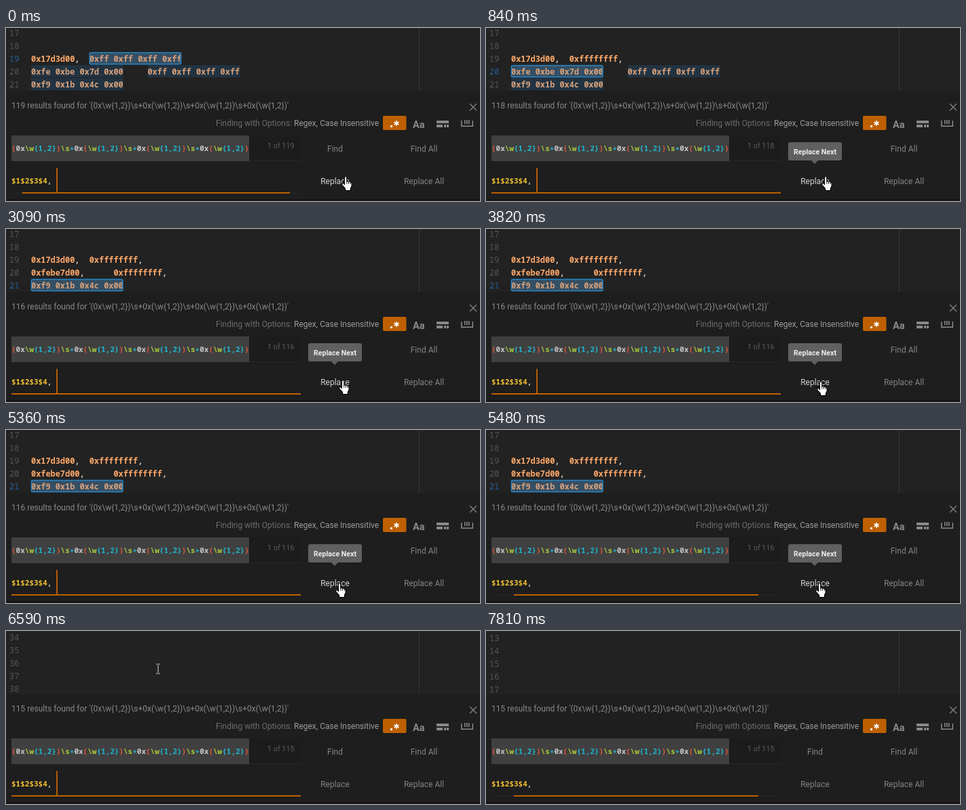
These frames come from a looping animation (698 px wide and 256 px high, 7.91 s). An HTML page with a canvas:

```html
<!DOCTYPE html>
<html lang="en">
<head>
<meta charset="utf-8">
<title>Find and replace</title>
<style>
  html, body { margin: 0; width: 100%; height: 100%; overflow: hidden; background: #1e1e1e; }
  canvas { display: block; }
</style>
</head>
<body>
<canvas id="stage" width="698" height="256"></canvas>
<script>
const g = document.getElementById('stage').getContext('2d');
const LOOP = 7910, W = 698, H = 256;
const PANEL_Y = 93, ROW = 19, CODE_X = 37, CHAR = 7.147, INPUT_CHAR = 6.6;
const MONO = '"Noto Sans Mono", "DejaVu Sans Mono", monospace';
const UI = 'Roboto, "Open Sans", sans-serif';
const CODE_FONT = `600 11.91px ${MONO}`, NUMBER_FONT = `11.91px ${MONO}`;
const INPUT_FONT = `600 11px ${MONO}`;
const ORANGE = '#bf6000';

const STEP = 140;               // pace of the screen updates
const BLINK = 390;              // caret half period
const CLICKS = [-STEP, 1240, 2080, 5480];
const WHEEL_START = 6320;
const FF = '[0xff 0xff 0xff 0xff]';

const ramp = (t, from, to) => Math.min(1, Math.max(0, (t - from) / (to - from)));
const ease = (t, from, to) => {
  const p = ramp(t, from, to);
  return p * p * (3 - 2 * p);
};

// A click blurs the field, one step later it regains focus, one more and the match is replaced.
function stateAt(t) {
  const clicks = t >= LOOP - STEP ? [...CLICKS, LOOP - STEP] : CLICKS;
  const since = t - clicks.filter(c => t >= c).pop();
  const replaced = CLICKS.filter(c => t >= c + 2 * STEP).length;
  const focused = since - STEP;
  const leave = ease(t, 5760, 6180);
  const nudge = ease(t, 2360, 2510), drift = ease(t, 3370, 4250);
  let scroll = replaced < 4 ? 315 : 876;
  if (t >= WHEEL_START) {
    const turns = 1 + Math.floor((t - WHEEL_START) / STEP);
    scroll = Math.max(236, 876 - 120 * turns);
  }
  return {
    replaced, scroll,
    underline: Math.min(213, 180 + 17 * Math.floor(since / STEP)),
    caret: focused >= 0 && Math.floor(focused / BLINK) % 2 === 0,
    tooltip: ramp(t, 400, 690) * Math.min(1, Math.abs(t - 3520) / 250) * (1 - ramp(t, 5760, 6000)),
    pointer: {
      kind: t > 7380 ? 'none' : leave > .2 ? 'beam' : 'hand',
      x: 494 - 4 * nudge - 5 * drift - 261 * leave,
      y: 219 + 4 * nudge + 3 * drift - 170 * leave
    }
  };
}

function rect(x, y, w, h, color) {
  g.fillStyle = color;
  g.fillRect(x, y, w, h);
}

function text(s, x, y, font, color, align = 'left') {
  g.font = font;
  g.fillStyle = color;
  g.textAlign = align;
  g.fillText(s, x, y);
}

function line(x1, y1, x2, y2, color, width) {
  g.strokeStyle = color;
  g.lineWidth = width;
  g.beginPath();
  g.moveTo(x1, y1);
  g.lineTo(x2, y2);
  g.stroke();
}

// Brackets mark a match; one left open runs on to the next wrapped row.
function codeFor(n, done) {
  if (n === 19) return '0x17d3d00,  ' + (done < 1 ? FF : '0xffffffff,');
  if (n === 20) {
    if (done < 2) return '[0xfe 0xbe 0x7d 0x00]     ' + FF;
    return '0xfebe7d00,      ' + (done < 3 ? FF : '0xffffffff,');
  }
  if (n === 21) return done < 4 ? '[0xf9 0x1b 0x4c 0x00]' : '0xf91b4c00,';
  return '';
}

// Wraps the byte list at the editor width and brackets every run of four.
function wrapBytes() {
  const ff = 'ff ff ff ff';
  const bytes = `${ff} 1 6e 9f 0 ${ff} e6 a8 c 0 ${ff} 1 87 df 0 ${ff} f4 92 df  0 ${ff} f9 d9 1d 0 ` +
    `${ff} 1 61 4c 0 ff  ff ff ff e6 bb ae 0 ${ff} 1 97 1d 0 ${ff} f3 df ee 0 ff`;
  const rows = [''];
  let col = 0, i = 0;
  for (const b of bytes.split(' ')) {
    if (b && col + b.length + 2 > 91) {
      rows.push('');
      col = 4;
    }
    const opens = i === 0 || (i > 5 && i % 4 === 2);
    const closes = i === 3 || (i > 6 && i % 4 === 1);
    rows[rows.length - 1] += b ? (opens ? '[' : '') + '0x' + b + (closes ? '] ' : ' ') : ' ';
    col += b ? b.length + 3 : 1;
    if (b) i++;
  }
  return rows.map(r => r.trimEnd());
}
const longLine = wrapBytes();

// Splits a marked row into plain text and match spans in pixels.
function parseRow(marked, x) {
  const spans = [];
  let plain = '';
  let start = /^[^\[]*\]/.test(marked) ? CODE_X : null;
  for (const c of marked) {
    const here = x + plain.length * CHAR;
    if (c === '[') start = here;
    else if (c === ']') { spans.push([start, here]); start = null; }
    else plain += c;
  }
  if (start !== null) spans.push([start, W]);
  return { plain, spans };
}

function codeRow(marked, x, mid, selected) {
  const { plain, spans } = parseRow(marked, x);
  const top = mid - 10;
  const sel = selected && spans[0];
  if (sel) rect(sel[0], top, sel[1] - sel[0] - 1, 18, '#39444d');
  text(plain.replace(/,/g, ' '), x, mid + 4, CODE_FONT, '#ffa869');
  text(plain.replace(/[^,]/g, ' '), x, mid + 4, CODE_FONT, '#d8cabc');
  for (const [a, b] of spans) rect(a, top, b - a, 18, 'rgba(34,128,206,.18)');
  if (sel) {
    g.strokeStyle = '#2a86c6';
    g.lineWidth = 1.5;
    g.beginPath();
    g.roundRect(sel[0] + .5, top + .5, sel[1] - sel[0] - 1.5, 17, 2);
    g.stroke();
  }
}

function editor(scroll, done) {
  g.save();
  g.beginPath();
  g.rect(0, 0, W, PANEL_Y);
  g.clip();
  rect(0, 0, W, PANEL_Y, '#222222');
  rect(608, 0, 1, PANEL_Y, '#343434');
  const activeLine = done < 1 ? 19 : done < 3 ? 20 : done < 4 ? 21 : 48;
  const first = Math.floor((scroll - 10) / ROW);
  for (let n = first; n < first + 8 && n <= 48; n++) {
    const mid = n * ROW - scroll, active = n === activeLine;
    text(n, 5, mid + 4, NUMBER_FONT, active ? '#28609a' : '#575757');
    if (n < 48) codeRow(codeFor(n, done), CODE_X, mid, active);
    else longLine.forEach((row, i) => {
      const y = mid + i * ROW;
      if (i) text('•', 9, y + 4, NUMBER_FONT, '#575757');
      codeRow(row, CODE_X + (i ? 4 * CHAR : 0), y, active && !i);
    });
  }
  g.restore();
}

function regexInput() {
  const pattern = '(0x\\w{1,2})' + '\\s+0x(\\w{1,2})'.repeat(3);
  const colorOf = s => /[()]/.test(s) ? '#e0583c' : s[0] === '\\' ? '#a6c83c' :
    s === '0x' ? '#c4c4c4' : '#1fb4cc';
  for (const m of pattern.matchAll(/0x|\\.|\{.*?\}|./g)) {
    text(m[0], 8 + m.index * INPUT_CHAR, 182, INPUT_FONT, colorOf(m[0]));
  }
  return pattern;
}

function optionIcons() {
  const gray = '#8a8a8a';
  g.fillStyle = ORANGE;
  g.beginPath();
  g.roundRect(555, 130, 34.5, 21, 2);
  g.fill();
  rect(566, 144, 3, 3, '#ffffff');
  for (let i = 0; i < 3; i++) {
    const a = Math.PI * (i / 3 + .5), dx = 4 * Math.cos(a), dy = 4 * Math.sin(a);
    line(575 - dx, 141 - dy, 575 + dx, 141 + dy, '#ffffff', 1.6);
  }
  text('Aa', 599, 147.5, `bold 14.5px ${UI}`, gray);
  rect(634, 137, 18, 4, gray);
  rect(634, 143, 9, 4, gray);
  for (let i = 0; i < 2; i++) rect(645 + 4 * i, 143, 3, 4, gray);
  for (let i = 0; i < 3; i++) rect(675 + 3 * i, 136, 1.5, 6, gray);
  for (const x of [670, 686.5]) rect(x, 137, 1.5, 9, gray);
  rect(670, 144.5, 18, 1.5, gray);
}

function panel(done, underline, caret, hover) {
  const ui = `12px ${UI}`, dim = '#848484';
  const count = 119 - done;
  rect(0, PANEL_Y, W, H - PANEL_Y, '#1e1e1e');
  rect(0, 253, W, 3, '#191517');
  rect(358, 159, 76, 37, '#1c1c1c');
  rect(8, 196, 426, 1, '#292929');
  rect(8, 244, 426, 1, '#272727');
  rect(8, 159, 350, 38, '#404040');
  const pattern = regexInput();
  text(`${count} results found for '${pattern}'`, 8, 119, ui, '#858a8f');
  line(683, 112, 693, 122, '#7c7c7c', 1.5);
  line(693, 112, 683, 122, '#7c7c7c', 1.5);
  text('Finding with Options:', 309, 145, ui, '#6c6c6c');
  text('Regex, Case Insensitive', 424, 145, ui, '#9c9c9c');
  optionIcons();
  text(`1 of ${count}`, 385, 178, `10.8px ${UI}`, '#5c5c5c');
  text('Find', 484.5, 183, ui, dim, 'center');
  text('Find All', 615.5, 183, ui, dim, 'center');
  text('Replace', 484.5, 231, ui, hover ? '#d2d2d2' : dim, 'center');
  text('Replace All', 615.5, 231, ui, dim, 'center');
  text('$1$2$3$4', 8, 230, `bold 11px ${MONO}`, '#f2c230');
  text(',', 8 + 8 * INPUT_CHAR, 230, `bold 11px ${MONO}`, '#d8d0c0');
  rect(221 - underline, 243, underline * 2, 2, ORANGE);
  if (caret) rect(74, 207, 2, 36, '#b45c06');
}

function tooltip(alpha) {
  if (!alpha) return;
  g.globalAlpha = alpha;
  g.fillStyle = '#606060';
  g.beginPath();
  g.roundRect(445, 169, 79, 27, 3);
  g.moveTo(479, 196);
  g.lineTo(489, 196);
  g.lineTo(484, 201);
  g.fill();
  text('Replace Next', 484.5, 187, `bold 10.6px ${UI}`, '#ececec', 'center');
  g.globalAlpha = 1;
}

const handShape = new Path2D('M4 1.8Q5.5 -.3 7 1.8V8Q8.6 7 9.5 8.6Q11 7.8 11.8 9.4' +
  'Q13.5 9 13.5 11V15L12 18V21.5H5V18.5L1 13.5Q-.3 10.8 2 10.6L4 12.6Z');

function pointer({ kind, x, y }) {
  g.save();
  g.translate(Math.round(x), Math.round(y));
  if (kind === 'beam') {
    line(0, -6, 0, 6, '#d8d8d8', 1);
    for (const end of [-7, 7]) {
      line(-3, end, -.5, end, '#d8d8d8', 1);
      line(.5, end, 3, end, '#d8d8d8', 1);
    }
  } else if (kind === 'hand') {
    g.scale(1.12, 1);
    g.fillStyle = '#ffffff';
    g.fill(handShape);
    g.strokeStyle = '#000000';
    g.lineWidth = 1;
    g.stroke(handShape);
    for (let i = 0; i < 3; i++) line(7 + 2.4 * i, 8 + i, 7 + 2.4 * i, 12, '#000000', .8);
  }
  g.restore();
}

function draw(t) {
  const now = stateAt(t);
  editor(now.scroll, now.replaced);
  panel(now.replaced, now.underline, now.caret, now.pointer.kind === 'hand');
  tooltip(now.tooltip);
  pointer(now.pointer);
}

const begin = performance.now();
function tick() {
  draw((performance.now() - begin) % LOOP);
  requestAnimationFrame(tick);
}
tick();
</script>
</body>
</html>
```
